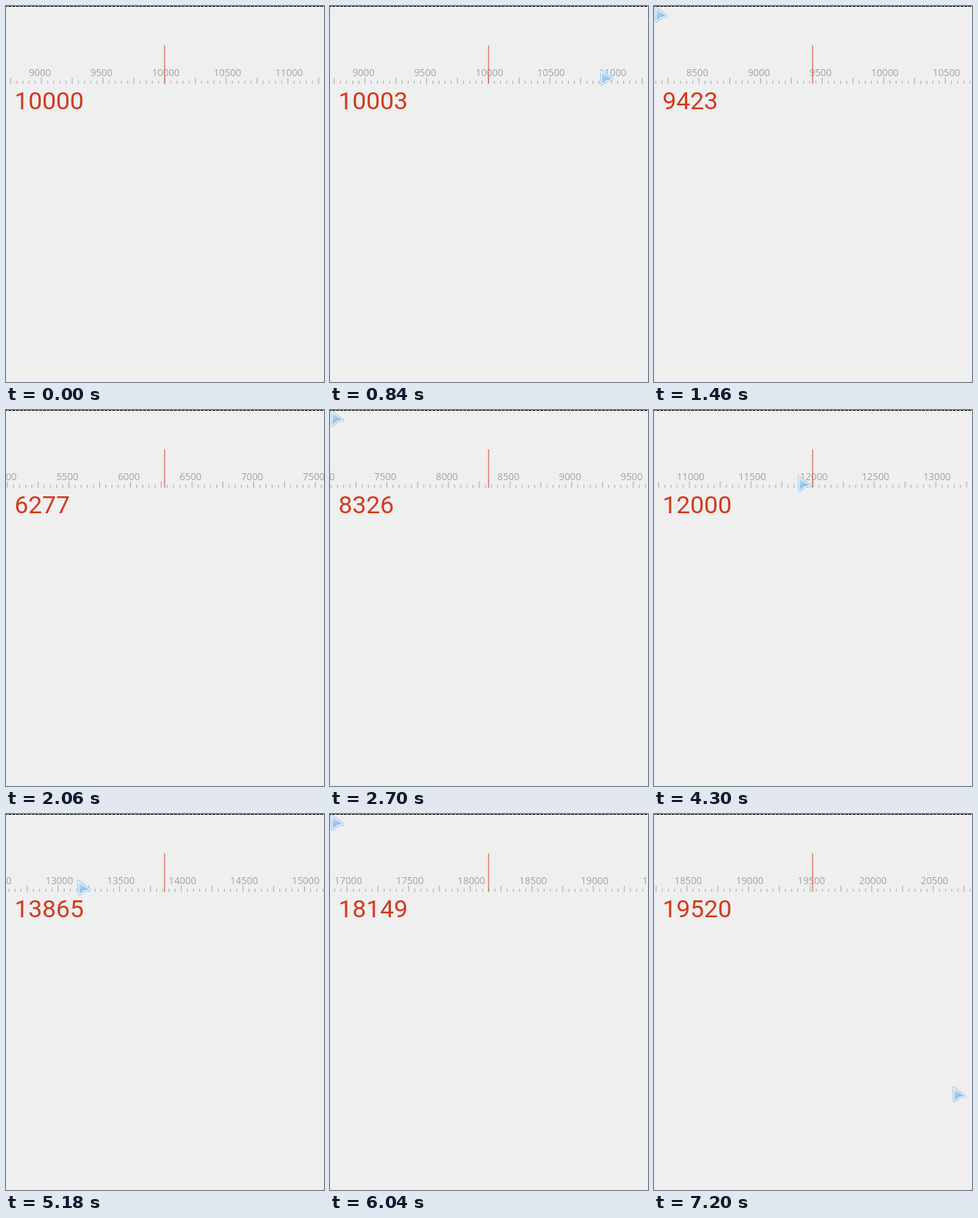
Animation, 413 px wide and 488 px high, one loop 7.22 s. Source, as an HTML page with a canvas:

```html
<!DOCTYPE html>
<html lang="en">
<head>
<meta charset="utf-8">
<title>Ruler picker</title>
<style>
html, body { margin: 0; width: 100%; height: 100%; overflow: hidden; background: #efefef; }
canvas { display: block; }
</style>
</head>
<body>
<canvas id="stage" width="413" height="488"></canvas>
<script>
const W = 413, H = 488, LOOP = 7220, STEP = 20, TRAVEL = 300;
const CENTER = 206, BASE = 101, PX_PER_UNIT = 0.16;
const ctx = document.getElementById('stage').getContext('2d');

// Each swipe drags the ruler to a value; grab is the pointer's x when it begins.
const swipes = [
  { from: 620, to: 800, value: 10008, grab: 350 },
  { from: 800, to: 1460, value: 9423, grab: 349 },
  { from: 1460, to: 2180, value: 6051, grab: 441 },
  { from: 2520, to: 2700, value: 8326, grab: 369 },
  { from: 2700, to: 3240, value: 9229, grab: 5 },
  { from: 3260, to: 3580, value: 11453, grab: 379 },
  { from: 3720, to: 3940, value: 12000, grab: 23 },
  { from: 4440, to: 4720, value: 12425, grab: 390 },
  { from: 4860, to: 5500, value: 15305, grab: 322 },
  { from: 5600, to: 6040, value: 18149, grab: 507 },
  { from: 6040, to: 6320, value: 18620, grab: 52 },
  { from: 6520, to: 6740, value: 19520, grab: 146 },
  { from: 7200, to: LOOP, value: 19520, grab: 387, y: 353 }
];

const ease = u => (1 - Math.cos(Math.PI * Math.min(1, Math.max(0, u)))) / 2;
const mix = (a, b, u) => a + (b - a) * u;

// Between swipes the pointer travels to the next grab point.
function poseAt(t) {
  let value = 10000, x = 368, y = 177, last = 0;
  for (const s of swipes) {
    if (t < last) break;
    const travel = ease(1 - (s.from - t) / Math.min(TRAVEL, s.from - last));
    x = mix(x, s.grab, travel);
    y = mix(y, s.y || 81 + t / 1200, travel);
    if (t < s.from) break;
    const moved = (s.value - value) * ease((t - s.from) / (s.to - s.from));
    value += moved;
    x -= moved * PX_PER_UNIT;
    last = s.to;
  }
  return { value: Math.round(value), x: Math.round(x), y: Math.round(y) };
}

function line(x, top, color) {
  ctx.strokeStyle = color;
  ctx.beginPath();
  ctx.moveTo(x, top);
  ctx.lineTo(x, BASE);
  ctx.stroke();
}

function drawRuler(value) {
  const reach = CENTER / PX_PER_UNIT + 250;
  ctx.fillStyle = '#a2a2a2';
  ctx.font = '12.5px "Open Sans", "Noto Sans", sans-serif';
  for (let n = Math.ceil((value - reach) / 50) * 50; n < value + reach; n += 50) {
    const x = CENTER + (n - value) * PX_PER_UNIT;
    line(x, n % 250 ? 97 : 93, '#aaa');
    if (n % 500 === 0) ctx.fillText(n, x - 16.3, 91);
  }
  line(CENTER, 51, '#d84c33');
  ctx.fillStyle = '#d03a1c';
  ctx.font = '32px Roboto, Arial, sans-serif';
  ctx.fillText(value, 11, 134);
}

const arrow = new Path2D('M2 2L17 13.5L9 15L3 20Z');

function drawPointer(x, y) {
  ctx.save();
  ctx.translate(x, y);
  ctx.lineJoin = 'round';
  const fill = ctx.createLinearGradient(2, 3, 11, 17);
  fill.addColorStop(0, '#d3e6f6');
  fill.addColorStop(1, '#7db4e4');
  ctx.strokeStyle = '#8fc1ec';
  ctx.lineWidth = 3;
  ctx.stroke(arrow);
  ctx.fillStyle = fill;
  ctx.fill(arrow);
  ctx.strokeStyle = '#eef6fd';
  ctx.lineWidth = 1.3;
  ctx.stroke(arrow);
  ctx.restore();
}

function draw(t) {
  const { value, x, y } = poseAt(t);
  ctx.fillStyle = '#efefef';
  ctx.fillRect(0, 0, W, H);
  ctx.fillStyle = '#000';
  for (let dash = -2; dash < W; dash += 5) ctx.fillRect(dash, 0, 4, 1);
  drawRuler(value);
  if (t >= STEP) drawPointer(x, y);
}

const start = performance.now();
function frame() {
  const t = (performance.now() - start) % LOOP;
  draw(Math.floor(t / STEP) * STEP);
  requestAnimationFrame(frame);
}
frame();
</script>
</body>
</html>
```
